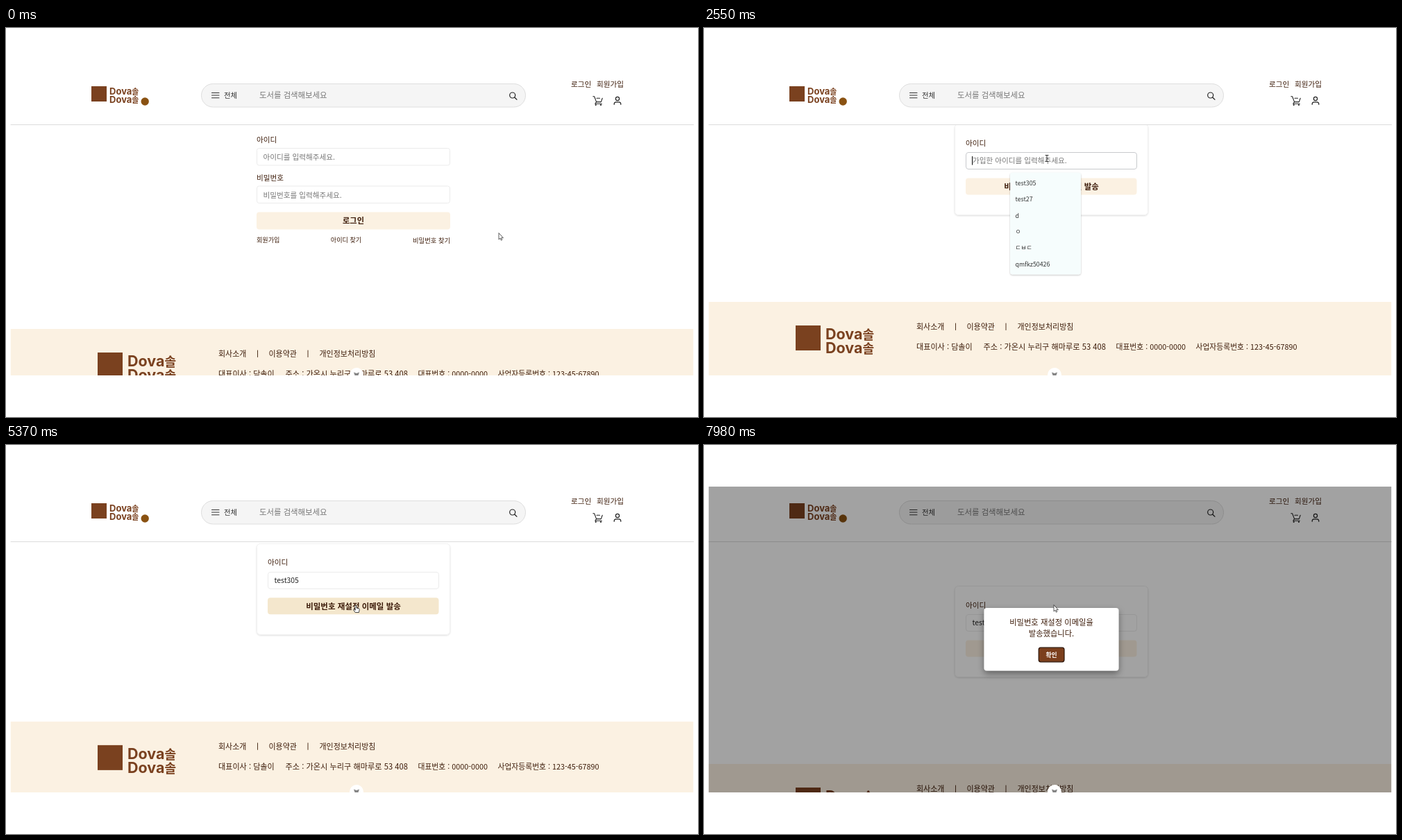
These frames come from a looping animation (997x561 px, 8 s). An HTML page:

```html
<!DOCTYPE html>
<html lang="ko">
<head>
<meta charset="utf-8">
<title>비밀번호 찾기</title>
<style>
  html, body { margin: 0; width: 100%; height: 100%; overflow: hidden; background: #fff; }
  svg { display: block; width: 100%; height: 100%; }
  text { font-family: "Noto Sans CJK KR", "Noto Sans CJK", "Noto Sans", sans-serif; white-space: pre; }
  .brand { font-family: Inter, "Noto Sans CJK KR", sans-serif; font-weight: 700; }
</style>
</head>
<body>
<svg id="stage" viewBox="0 0 997 561" xmlns="http://www.w3.org/2000/svg">
  <defs>
    <clipPath id="view"><rect x="6.5" y="140" width="984" height="361"/></clipPath>
    <clipPath id="screen"><rect x="6.5" y="60" width="984" height="441"/></clipPath>
    <filter id="faint" x="-20%" y="-20%" width="140%" height="150%">
      <feDropShadow dx="0" dy="1" stdDeviation=".8" flood-opacity=".13"/>
    </filter>
    <filter id="soft" x="-20%" y="-20%" width="140%" height="150%">
      <feDropShadow dx="0" dy="1" stdDeviation="1" flood-opacity=".25"/>
    </filter>
    <filter id="deep" x="-20%" y="-20%" width="140%" height="160%">
      <feDropShadow dx="0" dy="4" stdDeviation="5" flood-opacity=".4"/>
    </filter>
  </defs>
  <rect width="997" height="561" fill="#fff"/>
  <g clip-path="url(#view)">
    <g id="login"></g>
    <g id="reset"></g>
    <g id="footer"></g>
    <g id="menu"></g>
    <g id="status"></g>
  </g>
  <g id="header"></g>
  <g clip-path="url(#screen)">
    <rect id="shade" x="6.5" y="60" width="984" height="441" fill="#000"/>
    <g id="modal"></g>
    <circle cx="505" cy="500" r="10" fill="#fff"/>
    <path d="M501 496.5 L505 498 L509 496.5 L507.5 501 H502.5 Z" fill="#858585"/>
  </g>
  <g id="cursor" stroke-linejoin="round" stroke-linecap="round">
    <path id="arrow" d="M0 0 V9 L2 7.2 L3.4 10.2 L4.8 9.5 L3.4 6.7 H6 Z" fill="#fff" stroke="#333" stroke-width=".8"/>
    <path id="hand" d="M-1 0.8 Q0 -.6 1 .8 V4 L4.3 4.8 Q5.4 5.2 5.2 6.6 L4.4 10.5 H-.8 L-3.6 6.6 Q-3.3 5.2 -1 7 Z" fill="#fff" stroke="#333" stroke-width=".9"/>
    <path id="beam" d="M-2 -4.5 H2 M0 -4.5 V4.5 M-2 4.5 H2" fill="none" stroke="#333" stroke-width="1"/>
  </g>
</svg>
<script>
const NS = "http://www.w3.org/2000/svg";
const $ = id => document.getElementById(id);
const INK = "#3d1c0a", BROWN = "#7a411f", CREAM = "#fbf1e2", GREY = "#777";
const USER_ID = "test305", PREFIX = "test";

function add(parent, tag, attrs, body) {
  const el = document.createElementNS(NS, tag);
  for (const k in attrs) el.setAttribute(k, attrs[k]);
  if (body !== undefined) el.textContent = body;
  parent.appendChild(el);
  return el;
}
// y is the vertical middle of the line
function label(parent, x, y, size, body, fill = INK, extra = {}) {
  return add(parent, "text", { x, y: y + size * 0.38, "font-size": size, fill, ...extra }, body);
}
function brand(parent, x, y, size) {
  const word = label(parent, x, y, size, "Dova", BROWN, { class: "brand" });
  add(word, "tspan", { "font-size": size * 0.84 }, "솔");
}
function box(parent, x, y, width, height, rx, fill, stroke = "none", extra = {}) {
  return add(parent, "rect", { x, y, width, height, rx, fill, stroke, ...extra });
}
function line(parent, d, stroke, width = 1) {
  return add(parent, "path", { d, stroke, "stroke-width": width, fill: "none", "stroke-linecap": "round", "stroke-linejoin": "round" });
}
const bold = { "font-weight": 700 };
const mid = { "text-anchor": "middle" };
const end = { "text-anchor": "end" };

function buildHeader(g) {
  box(g, 6.5, 60, 984, 80, 0, "#fff");
  line(g, "M7 139.5 H990.5", "#dcdcdc");
  box(g, 123, 84, 22, 22, 0, BROWN);
  for (const y of [91.5, 103.5]) brand(g, 149, y, 13);
  add(g, "circle", { cx: 200.2, cy: 106, r: 5.7, fill: "#8a5212" });

  box(g, 281.5, 80.5, 467, 33.5, 16.75, "#f5f5f5", "#dedede");
  line(g, "M296.5 93.5 H307 M296.5 97 H307 M296.5 100.8 H307", "#333", 1.1);
  label(g, 314, 97, 10.4, "전체", "#333");
  label(g, 365, 97, 11.4, "도서를 검색해보세요", GREY);
  add(g, "circle", { cx: 729.7, cy: 97, r: 4, fill: "none", stroke: "#222", "stroke-width": 1.2 });
  line(g, "M732.7 100 L736 103.2", "#222", 1.2);

  label(g, 814, 81, 10.6, "로그인");
  label(g, 851, 81, 10.6, "회원가입");
  line(g, "M845.8 98.8 H847.6 L850.6 106.6 H857.3 L859.2 101.3 M851 101.3 H855.5 M850.6 106.6 L848.8 109.3 H858.3", "#222", 1.1);
  for (const cx of [849.7, 857]) add(g, "circle", { cx, cy: 111, r: 1.1, fill: "#222" });
  add(g, "circle", { cx: 881, cy: 102, r: 2.6, fill: "none", stroke: "#222", "stroke-width": 1.2 });
  line(g, "M876.2 110.3 V109.4 Q876.4 106.8 879 106.8 H883 Q885.6 106.8 885.8 109.4 V110.3", "#222", 1.2);
}

function buildLogin(g) {
  [["아이디", 161, "아이디를 입력해주세요."], ["비밀번호", 215.5, "비밀번호를 입력해주세요."]].forEach(([name, y, hint]) => {
    label(g, 361, y, 10.6, name);
    box(g, 361.5, y + 12.5, 278, 24.5, 3, "#fff", "#ebebeb");
    label(g, 370.5, y + 25, 10.6, hint, GREY);
  });
  box(g, 361, 265.5, 279, 25, 4, CREAM);
  label(g, 500.5, 278, 11.2, "로그인", INK, { ...bold, ...mid });
  label(g, 361, 306, 9.1, "회원가입");
  label(g, 490, 306, 9.1, "아이디 찾기", INK, mid);
  return label(g, 640, 306, 9.3, "비밀번호 찾기", INK, end);
}

function buildReset(g) {
  box(g, 361.5, 203.5, 278, 131, 5, "#fff", "#f1f1f1", { filter: "url(#faint)" });
  label(g, 377, 230.5, 10.6, "아이디");
  return {
    field: box(g, 377.5, 244.5, 246, 24, 3.5, "#fff"),
    hint: label(g, 387, 256, 10.6, "가입한 아이디를 입력해주세요.", GREY),
    value: label(g, 386.5, 256, 10.4, "", "#222"),
    caret: add(g, "rect", { y: 250, width: 1.1, height: 12.5, fill: "#111" }),
    button: box(g, 377, 281.5, 246.5, 24, 4, CREAM),
    caption: label(g, 500.5, 293.5, 11.5, "비밀번호 재설정 이메일 발송", INK, { ...bold, ...mid })
  };
}

function buildFooter(g) {
  box(g, 6.5, 0, 984, 200, 0, CREAM);
  box(g, 132, 34, 36, 36, 0, BROWN);
  for (const y of [46, 66]) brand(g, 175, y, 21.5);
  label(g, 306, 35.5, 11, "회사소개");
  label(g, 378.5, 35.5, 11, "이용약관");
  label(g, 451.5, 35.5, 11, "개인정보처리방침");
  line(g, "M362.5 31 V40.5 M435 31 V40.5", INK, 0.9);
  label(g, 306, 64.8, 11.1, "대표이사 : 담솔이");
  label(g, 402.5, 64.8, 11.2, "주소 : 가온시 누리구 해마루로 53 408");
  label(g, 593.5, 64.8, 10.8, "대표번호 : 0000-0000");
  label(g, 708.5, 64.8, 10.8, "사업자등록번호 : 123-45-67890");
}

function buildMenu(g) {
  const panel = box(g, 441, 208.5, 102, 147, 4, "#f6fdfd", "none", { filter: "url(#soft)" });
  const items = [USER_ID, "test27", "d", "ㅇ", "ㄷㅂㄷ", "qmfkz50426"]
    .map((s, i) => label(g, 448.5, 223.7 + i * 23.3, 8.8, s, "#333"));
  return { panel, items };
}

function buildStatus(g) {
  box(g, 6.5, 491.5, 131, 12, 0, "#bcdcd7");
  label(g, 9, 498.5, 8.2, "localhost:5173/find-password", "#8aa39f");
}

function buildModal(g) {
  box(g, 403.5, 235, 194, 90.5, 4, "#fff", "none", { filter: "url(#deep)" });
  label(g, 500.5, 255.5, 11.3, "비밀번호 재설정 이메일을", INK, mid);
  label(g, 500.5, 271.5, 11.3, "발송했습니다.", INK, mid);
  box(g, 482.2, 292.2, 36.8, 20.6, 3, "#7b3f1d", "#2b1408", { "stroke-width": 1.2 });
  label(g, 500.5, 302.5, 8.8, "확인", "#fff", { ...bold, ...mid });
}

buildHeader($("header"));
const findLink = buildLogin($("login"));
const form = buildReset($("reset"));
buildFooter($("footer"));
const menu = buildMenu($("menu"));
buildStatus($("status"));
buildModal($("modal"));

const LOOP = 8000;
const OPEN_PAGE = 1740, FOCUS = 2400, PICK = 4560;
const KEYS = [2940, 3060, 3180, 3300];
const PATH = [
  [500, 710, 296], [1150, 618, 268], [1900, 618, 268], [2250, 494, 188],
  [4000, 494, 188], [4350, 466, 224], [4650, 466, 224], [5050, 504, 231]
];

const ramp = (t, from, to) => Math.min(1, Math.max(0, (t - from) / (to - from)));
const ease = p => p < 0.5 ? 2 * p * p : 1 - 2 * (1 - p) * (1 - p);
const show = (el, on) => el.setAttribute("display", on ? "inline" : "none");
const inside = (x, y, l, t, r, b) => x >= l && x <= r && y >= t && y <= b;

function pointer(t) {
  let [, x, y] = PATH[0];
  for (let i = 1; i < PATH.length; i++) {
    const [t0, x0, y0] = PATH[i - 1], [t1, x1, y1] = PATH[i];
    if (t < t0) break;
    const p = ease(ramp(t, t0, t1));
    x = x0 + (x1 - x0) * p;
    y = y0 + (y1 - y0) * p;
  }
  return [x, y];
}

function draw(t) {
  const onReset = t >= OPEN_PAGE;
  const scroll = onReset ? 65 - 65 * ease(ramp(t, 5315, 5640)) : 39 * ease(ramp(t, 750, 1000));
  const [x, y] = pointer(t);
  const py = y + scroll;

  show($("login"), !onReset);
  show($("reset"), onReset);
  $("login").setAttribute("transform", `translate(0 ${-scroll})`);
  $("reset").setAttribute("transform", `translate(0 ${-scroll})`);
  $("footer").setAttribute("transform", `translate(0 ${(onReset ? 460 : 434) - scroll})`);

  const picked = t >= PICK;
  const focused = t >= FOCUS && t < 5150;
  const typed = KEYS.filter(k => t >= k).length;
  const menuOpen = t >= FOCUS + 60 && !picked;
  const shown = typed ? 2 : menu.items.length;

  const overMenu = menuOpen && inside(x, y, 441, 208, 543, 356);
  const overLink = !onReset && inside(x, py, 586, 299, 640, 313);
  const overButton = onReset && !overMenu && inside(x, py, 377, 281.5, 623.5, 305.5);
  const overField = onReset && !overMenu && inside(x, py, 377, 244, 623.5, 268.5);

  findLink.setAttribute("text-decoration", overLink ? "underline" : "none");
  form.button.setAttribute("fill", overButton ? "#f4e7cd" : CREAM);
  form.field.setAttribute("stroke", focused ? "#c8cacd" : "#ebebeb");
  form.value.textContent = picked ? USER_ID : PREFIX.slice(0, typed);
  show(form.hint, !typed);

  const lastEdit = picked ? PICK : typed ? KEYS[typed - 1] : FOCUS;
  show(form.caret, focused && (t - lastEdit) % 1000 < 500);
  form.caret.setAttribute("x", 386 + (form.value.textContent ? form.value.getComputedTextLength() + 1 : 0));

  show($("menu"), menuOpen);
  menu.panel.setAttribute("height", 7.2 + shown * 23.3);
  menu.items.forEach((el, i) => show(el, i < shown));

  $("status").setAttribute("opacity", ramp(t, 1280, 1390) * (1 - ramp(t, 2100, 2250)));

  const dim = ramp(t, 7760, 7950);
  $("shade").setAttribute("opacity", 0.365 * dim);
  $("modal").setAttribute("opacity", dim);

  const hand = overLink || overButton;
  $("cursor").setAttribute("transform", `translate(${x} ${y})`);
  show($("hand"), hand);
  show($("beam"), overField);
  show($("arrow"), !hand && !overField);
}

function tick() {
  draw(performance.now() % LOOP);
  requestAnimationFrame(tick);
}
tick();
</script>
</body>
</html>
```
